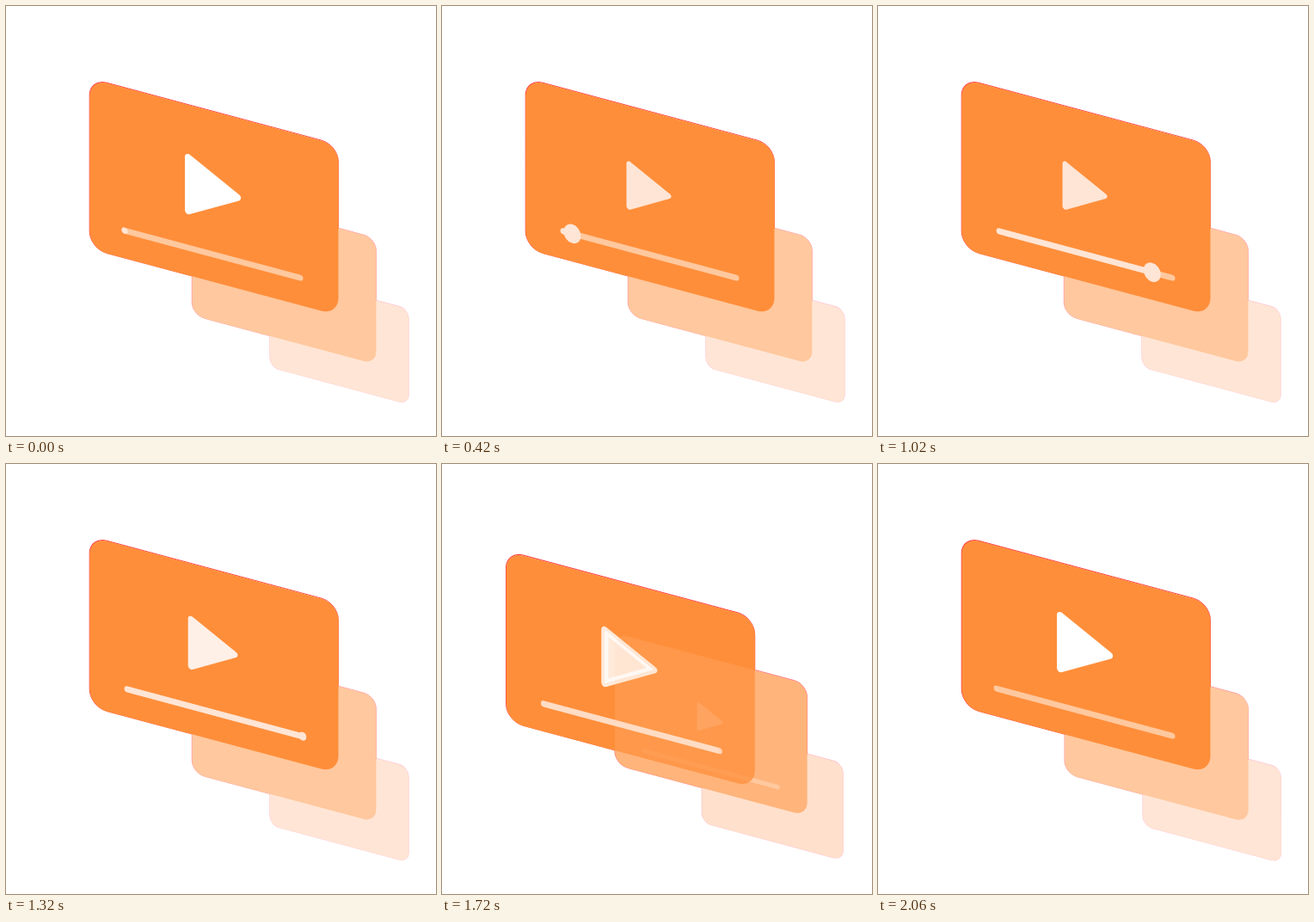
Write an HTML page with a canvas that moves like this. It is 500 by 500 pixels and loops after 2140 ms.

```html
<!DOCTYPE html>
<html lang="en">
<head>
<meta charset="utf-8">
<title>Video cards</title>
<style>
  html, body { margin: 0; width: 100%; height: 100%; overflow: hidden; background: #fff; }
  canvas { display: block; width: 500px; height: 500px; }
</style>
</head>
<body>
<canvas width="500" height="500"></canvas>
<script>
const ctx = document.querySelector('canvas').getContext('2d');
const LOOP = 2140, STEP = 20;
const SLOPE = Math.tan(Math.PI / 12);
const W = 289, H = 198, BAR_Y = 166;

// Resting places of the queue: x, y, scale
const SLOTS = [[97.5, 84.4, 1], [216.5, 213, 0.74], [307, 309.5, 0.558], [455, 462, 0.2]];
const EXIT = [3.5, 154.4, 1];
const ORANGE = [255, 142, 58], PEACH = [255, 200, 158], CREAM = [255, 229, 213], WHITE = [255, 255, 255];

const clamp = v => Math.min(1, Math.max(0, v));
const mix = (a, b, k) => a + (b - a) * k;
const mixAll = (a, b, k) => a.map((v, i) => mix(v, b[i], k));
const css = c => `rgb(${c.map(v => Math.round(clamp(v / 255) * 255))})`;
const ramp = (t, from, to) => clamp((t - from) / (to - from));
const smooth = u => u * u * (3 - 2 * u);

// Cubic Bezier easing with handles (x1, 0) and (x2, 1)
function ease(u, x1, x2) {
  if (u <= 0 || u >= 1) return clamp(u);
  let lo = 0, hi = 1, s;
  for (let i = 0; i < 24; i++) {
    s = (lo + hi) / 2;
    const r = 1 - s;
    if (3 * x1 * s * r * r + 3 * x2 * s * s * r + s * s * s < u) lo = s; else hi = s;
  }
  return smooth(s);
}

function inCard([x, y, scale], draw) {
  ctx.save();
  ctx.transform(scale, SLOPE * scale, 0, scale, x, y);
  draw();
  ctx.restore();
}

function body() {
  ctx.beginPath();
  ctx.roundRect(0, 0, W, H, 20);
}

function line(x1, x2, color) {
  ctx.strokeStyle = css(color);
  ctx.lineWidth = 7;
  ctx.lineCap = 'round';
  ctx.beginPath();
  ctx.moveTo(x1, BAR_Y);
  ctx.lineTo(x2 + 0.01, BAR_Y);
  ctx.stroke();
}

function playIcon({ scale, color, alpha = 1 }) {
  ctx.save();
  ctx.globalAlpha *= alpha;
  ctx.translate(143, 92);
  ctx.scale(scale, scale);
  ctx.beginPath();
  ctx.moveTo(-28.5, -31);
  ctx.lineTo(28.5, 0);
  ctx.lineTo(-28.5, 31);
  ctx.closePath();
  ctx.fillStyle = ctx.strokeStyle = css(color);
  ctx.lineJoin = 'round';
  ctx.lineWidth = 8;
  ctx.fill();
  ctx.stroke();
  ctx.restore();
}

// Thin reddish rim on the outer silhouette
function drawRim({ place, color: [r, g, b] }) {
  inCard(place, () => {
    ctx.translate(-0.2, -0.4);
    body();
    ctx.strokeStyle = css([r, g * 1.6 - 165, b * 0.9 + 20]);
    ctx.lineWidth = 1.2 / place[2];
    ctx.stroke();
  });
}

function drawCard({ place, color, icon, track, progress, knob }) {
  inCard(place, () => {
    body();
    ctx.fillStyle = css(color);
    ctx.fill();
    if (icon) playIcon(icon);
    if (track) line(...track, PEACH);
    if (progress) line(...progress, CREAM);
    if (knob > 0) {
      ctx.beginPath();
      ctx.ellipse(progress[1], BAR_Y, 10 * knob, 11 * knob, 0, 0, 7);
      ctx.fillStyle = css(CREAM);
      ctx.fill();
    }
  });
}

function playingCard(t) {
  const start = mix(40.5, 43.7, smooth(ramp(t, 40, 400)));
  const pressed = smooth(ramp(t, 40, 410)) - smooth(ramp(t, 1130, 1550));
  const out = ease(ramp(t, 1515, 2035), 0.65, 0.35);
  return {
    place: mixAll(SLOTS[0], EXIT, out),
    alpha: 1 - out,
    color: ORANGE,
    icon: { scale: 1 - 0.2 * pressed, color: mixAll(WHITE, CREAM, pressed) },
    track: [start, 244.5],
    progress: [start, mix(start, 247.5, ease(ramp(t, 200, 1350), 0.55, 0.45))],
    knob: smooth(ramp(t, 180, 380)) - smooth(ramp(t, 1170, 1450))
  };
}

function queuedCards(t) {
  const first = ease(ramp(t, 1591, 2040), 0.65, 0.1);
  const later = ease(ramp(t, 1615, 2125), 0.65, 0.1);
  const shown = ramp(t, 1600, 1700);
  const cards = [
    { place: mixAll(SLOTS[2], SLOTS[1], later), color: mixAll(CREAM, PEACH, ramp(t, 1660, 2015)) },
    {
      place: mixAll(SLOTS[1], SLOTS[0], first),
      color: mixAll(PEACH, ORANGE, ramp(t, 1625, 1895)),
      icon: shown && {
        scale: mix(0.4, 1, ramp(t, 1620, 1920)),
        color: mixAll(CREAM, WHITE, ramp(t, 1780, 1950)),
        alpha: shown
      },
      track: shown && [mix(44, 40.5, smooth(ramp(t, 1820, 2050))), 244.5]
    }
  ];
  if (later > 0.36) cards.unshift({ place: mixAll(SLOTS[3], SLOTS[2], later), color: CREAM });
  return cards;
}

function render(t) {
  ctx.clearRect(0, 0, 500, 500);
  const top = playingCard(t), queue = queuedCards(t);
  // Over the empty stage the leaving card is solid or absent; over cards it fades.
  const solid = top.alpha >= 0.5 ? [top] : [];
  [...solid, ...queue].forEach(drawRim);
  [...solid, ...queue].forEach(drawCard);
  ctx.save();
  ctx.globalAlpha = top.alpha;
  ctx.globalCompositeOperation = 'source-atop';
  drawCard(top);
  ctx.restore();
}

const begin = performance.now();
function tick() {
  const t = Math.floor((performance.now() - begin) % LOOP / STEP) * STEP;
  render(t < 60 ? 0 : Math.min(t, 2060));
  requestAnimationFrame(tick);
}
tick();
</script>
</body>
</html>
```
